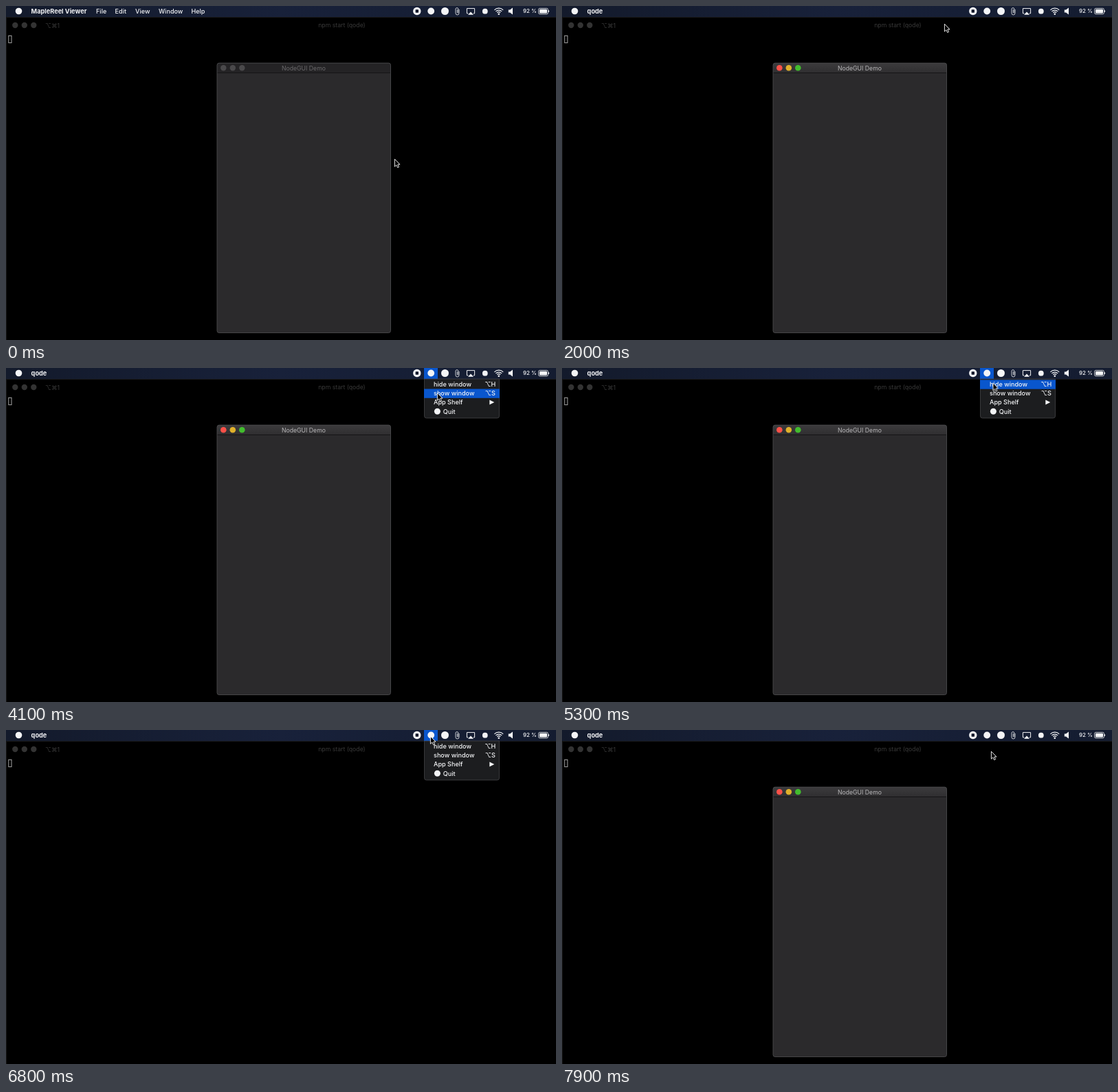
These frames come from a looping animation (800x487 px, 8000 ms). An HTML page:

```html
<!DOCTYPE html>
<html lang="en">
<head>
<meta charset="utf-8">
<title>Tray menu demo</title>
<style>
  html, body { margin: 0; width: 100%; height: 100%; overflow: hidden; background: #000; }
  svg { display: block; width: 800px; height: 487px; }
  text { font: 500 9.1px Inter, "DejaVu Sans", sans-serif; fill: #f4f5f7; white-space: pre; }
  .app { font-weight: 700; font-size: 9.2px; }
  .title { font-size: 8.7px; font-weight: 400; text-anchor: middle; }
  .key { text-anchor: end; }
  .dim { fill: #393939; }
  .line { fill: none; stroke: #f4f5f7; }
  .white { fill: #f4f5f7; }
  .blue { fill: #0956cd; }

  .anim { animation: 8s step-end infinite; }
  #player { animation-name: before-switch; }
  #qode { animation-name: after-switch; }
  #active { animation-name: focus; }
  #win { animation-name: win; }
  #menu { animation-name: menu; }
  #hide { animation-name: hide; }
  #show { animation-name: show; }
  #pointer { animation-name: move; }

  @keyframes before-switch { 0% { opacity: 1 } 8.75%, 100% { opacity: 0 } }
  @keyframes after-switch { 0% { opacity: 0 } 8.75%, 100% { opacity: 1 } }
  @keyframes focus { 0% { opacity: 0 } 7.5%, 100% { opacity: 1 } }
  @keyframes win {
    0% { opacity: 1 } 68.75% { opacity: 0 } 97.5%, 100% { opacity: 1 }
  }
  @keyframes menu {
    0% { opacity: 0 } 37.5% { opacity: 1 } 68.75% { opacity: .5 } 70% { opacity: 0 }
    78.75% { opacity: 1 } 97.5% { opacity: .5 } 98.75%, 100% { opacity: 0 }
  }
  @keyframes hide {
    0% { opacity: 0 } 50% { opacity: 1 } 51.25% { opacity: 0 }
    61.25% { opacity: 1 } 67.5% { opacity: 0 } 68.75% { opacity: 1 } 70% { opacity: 0 }
    87.5% { opacity: 1 } 93.75%, 100% { opacity: 0 }
  }
  @keyframes show {
    0% { opacity: 0 } 51.25% { opacity: 1 } 61.25% { opacity: 0 }
    93.75% { opacity: 1 } 96.25% { opacity: 0 } 97.5% { opacity: 1 } 98.75%, 100% { opacity: 0 }
  }
  @keyframes move {
    0% { transform: translate(565px, 223px) }
    1.25% { transform: translate(569px, 218px) }
    2.5% { transform: translate(556px, 226px) }
    3.75% { transform: translate(540px, 234px) }
    15% { transform: translate(592px, 110px) }
    16.25% { transform: translate(621px, 33px) }
    18.75% { transform: translate(605px, 35px) }
    20% { transform: translate(572px, 38px) }
    21.25% { transform: translate(543px, 41px) }
    22.5% { transform: translate(531px, 40px) }
    25% { transform: translate(556px, 26px) }
    26.25% { transform: translate(580px, 23px) }
    27.5% { transform: translate(597px, 21px) }
    28.75% { transform: translate(607px, 20px) }
    30% { transform: translate(610px, 19px) }
    32.5% { transform: translate(612px, 14px) }
    33.75% { transform: translate(615px, 8px) }
    35% { transform: translate(617px, 4px) }
    36.25% { transform: translate(618px, 3px) }
    47.5% { transform: translate(619px, 6px) }
    48.75% { transform: translate(621px, 13px) }
    50% { transform: translate(625px, 26px) }
    51.25% { transform: translate(627px, 36px) }
    60% { transform: translate(627px, 33px) }
    61.25% { transform: translate(627px, 26px) }
    62.5% { transform: translate(627px, 22px) }
    66.25% { transform: translate(626.5px, 21.5px) }
    72.5% { transform: translate(625px, 19px) }
    73.75% { transform: translate(622px, 14px) }
    75% { transform: translate(619px, 9px) }
    76.25% { transform: translate(617px, 6px) }
    85% { transform: translate(617px, 9px) }
    86.25% { transform: translate(618px, 14px) }
    87.5% { transform: translate(619px, 18px) }
    88.75% { transform: translate(620px, 22px) }
    90% { transform: translate(622px, 25px) }
    91.25% { transform: translate(623px, 28px) }
    92.5% { transform: translate(624px, 30px) }
    93.75%, 100% { transform: translate(624px, 31px) }
  }
</style>
</head>
<body>
<svg viewBox="0 0 800 487">
  <defs>
    <linearGradient id="bar">
      <stop offset="0" stop-color="#131a2b"/>
      <stop offset=".5" stop-color="#18213a"/>
      <stop offset="1" stop-color="#141c30"/>
    </linearGradient>
    <linearGradient id="chrome" x2="0" y2="1">
      <stop offset="0" stop-color="#3c3b3d"/>
      <stop offset="1" stop-color="#2f2e30"/>
    </linearGradient>
  </defs>

  <!-- terminal -->
  <rect width="800" height="487"/>
  <path d="M.5 487V16.5H800" fill="none" stroke="#181818"/>
  <g fill="#333">
    <circle cx="13.3" cy="28" r="4.2"/>
    <circle cx="26.8" cy="28" r="4.2"/>
    <circle cx="40.3" cy="28" r="4.2"/>
  </g>
  <text class="dim" x="57" y="31.5" style="font-size:8.7px;font-weight:400">⌥⌘1</text>
  <text class="title dim" x="488.5" y="31.4">npm start (qode)</text>
  <rect x="3.8" y="43.3" width="4.2" height="10.4" fill="none" stroke="#b5b5b5" stroke-width=".9"/>

  <!-- demo window -->
  <g id="win" class="anim">
    <rect x="307" y="83.2" width="252.5" height="393.3" rx="3" fill="#2b2a2c"/>
    <path d="M307 97.5V86.2a3 3 0 0 1 3-3H556.5a3 3 0 0 1 3 3V97.5Z" fill="#242325"/>
    <g fill="#4a494b">
      <circle cx="316.3" cy="90.3" r="4.2"/>
      <circle cx="329.8" cy="90.3" r="4.2"/>
      <circle cx="343.3" cy="90.3" r="4.2"/>
    </g>
    <text class="title" x="433" y="93.6" style="fill:#6b6a6c">NodeGUI Demo</text>
    <g id="active" class="anim">
      <path d="M307 97.5V86.2a3 3 0 0 1 3-3H556.5a3 3 0 0 1 3 3V97.5Z" fill="url(#chrome)"/>
      <circle cx="316.3" cy="90.3" r="4.3" fill="#fb5048"/>
      <circle cx="329.8" cy="90.3" r="4.3" fill="#e0b12b"/>
      <circle cx="343.3" cy="90.3" r="4.3" fill="#42bc2e"/>
      <text class="title" x="433" y="93.6" style="fill:#b9b8ba">NodeGUI Demo</text>
    </g>
    <path d="M307 97.5H559" stroke="#151516"/>
    <rect x="307" y="83.2" width="252.5" height="393.3" rx="3" fill="none" stroke="#4b4b4d" stroke-width=".9"/>
  </g>

  <!-- menu bar -->
  <rect width="800" height="16" fill="url(#bar)"/>
  <circle class="white" cx="18.5" cy="7.5" r="4.8"/>
  <g id="player" class="anim">
    <text class="app" x="36.6" y="10.8">MapleReel Viewer</text>
    <text x="131" y="10.8">File</text>
    <text x="158.6" y="10.8">Edit</text>
    <text x="188" y="10.8">View</text>
    <text x="222" y="10.8">Window</text>
    <text x="269.4" y="10.8">Help</text>
  </g>
  <text id="qode" class="app anim" x="36.6" y="10.8">qode</text>

  <!-- tray menu -->
  <g id="menu" class="anim">
    <rect class="blue" x="608" width="20" height="16"/>
    <path d="M608.5 16H717.5V70a3 3 0 0 1-3 3H611.5a3 3 0 0 1-3-3Z" fill="#1c1d1f" stroke="#444547" stroke-width=".8"/>
    <rect id="hide" class="blue anim" x="608" y="17.3" width="110" height="13.4"/>
    <rect id="show" class="blue anim" x="608" y="30.5" width="110" height="13.3"/>
    <text x="622" y="27.1">hide window</text>
    <text class="key" x="712.3" y="27.1">⌥H</text>
    <text x="622" y="40.2">show window</text>
    <text class="key" x="712" y="40.2">⌥S</text>
    <text x="622" y="53.3">App Shelf</text>
    <path class="white" d="M703.3 46.6L710.3 50L703.3 53.4Z"/>
    <circle class="white" cx="627.4" cy="63.2" r="4.5"/>
    <text x="635.8" y="66.5">Quit</text>
  </g>

  <!-- status icons -->
  <g class="white">
    <circle cx="597.8" cy="7.5" r="5.7"/>
    <rect x="595.6" y="5.3" width="4.4" height="4.4" rx=".7" fill="#10172a"/>
    <circle cx="618.2" cy="7.5" r="4.9"/>
    <circle cx="638.5" cy="7.5" r="5.5"/>
    <circle cx="696.8" cy="7.7" r="3.9"/>
    <path d="M672 12.8L676 8.4L680 12.8Z"/>
    <path d="M730.8 5.6H733L737 2.6V12.4L733 9.4H730.8Z"/>
    <rect x="776" y="4.8" width="11" height="5.6" rx=".9"/>
    <path d="M789 6v3.2a1.7 1.7 0 0 0 0-3.2Z"/>
    <circle cx="716.8" cy="11.7" r="1.3"/>
  </g>
  <g class="line" stroke-width="1">
    <path d="M656.3 5.2V9.6a.9.9 0 0 0 1.6 0V4.2a2 2 0 0 0-3.9 0V10.4a2.5 2.5 0 0 0 5 0V5" stroke-width=".8"/>
    <path d="M672.3 10.8H670.4V3.6H681.6V10.8H679.7"/>
    <path d="M710.4 5.8a9 9 0 0 1 12.8 0M712.4 7.9a6.2 6.2 0 0 1 8.8 0M714.4 9.9a3.4 3.4 0 0 1 4.8 0" stroke-width="1.2"/>
    <rect x="774.6" y="3.4" width="13.8" height="8.4" rx="1.9" stroke-width=".8"/>
  </g>
  <text x="752" y="10.4" style="font-size:8px">92 %</text>

  <g id="pointer" class="anim">
    <path d="M.4 .2V11.2L2.9 8.9L4.6 12.6L6.5 11.8L4.8 8.1H8Z" stroke="#fff" stroke-width=".9" stroke-linejoin="round"/>
  </g>
</svg>
</body>
</html>
```
